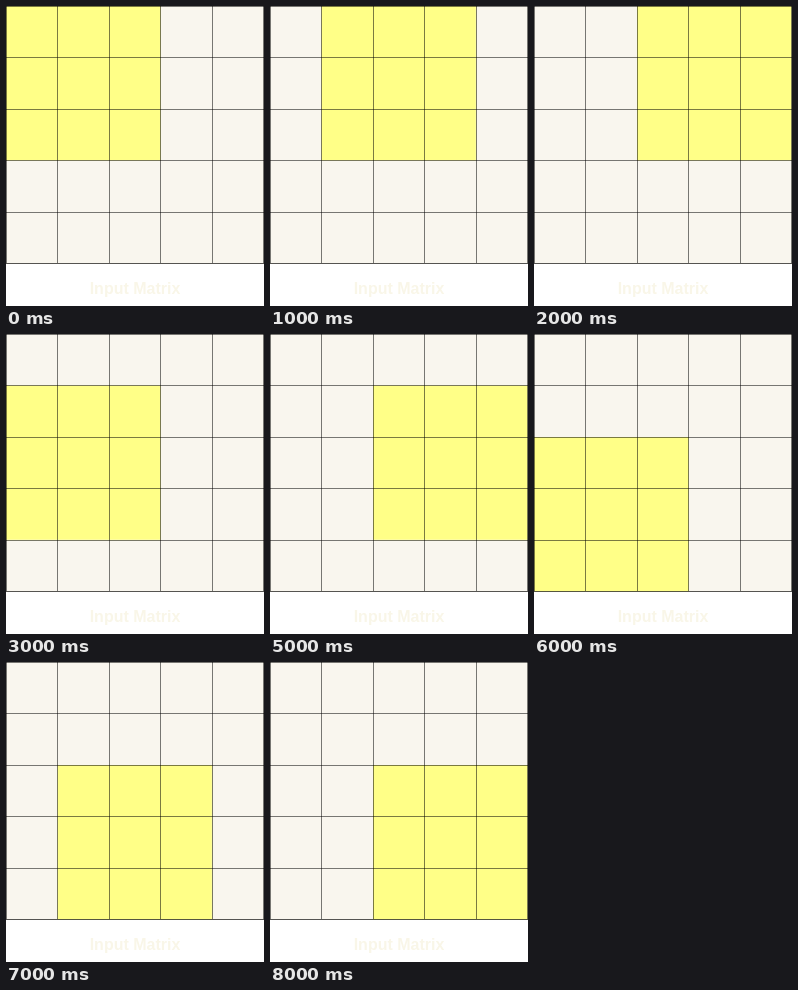
Write an HTML page that moves like this. It is 258 px wide and 300 px high and loops after 9 s.

```html
<!DOCTYPE html>
<html lang="en">
<head>
<meta charset="utf-8">
<title>Input Matrix</title>
<style>
  html, body { margin: 0; width: 100%; height: 100%; overflow: hidden; background: #fff; }
  svg { display: block; width: 258px; height: 300px; }
  .cells { fill: #f9f6ee; }
  .window { fill: #ffff87; }
  .lines { fill: none; stroke: #000; stroke-opacity: .52; }
  .base { stroke-opacity: .66; }
  text { font: bold 16px "Liberation Sans", Arial, sans-serif; text-anchor: middle; fill: #f9f6e8; }

  /* The window scans three columns, then drops one row. */
  .column { animation: across 3s steps(3) infinite; }
  .row { animation: down 9s steps(3) infinite; }
  @keyframes across { to { transform: translateX(154.5px); } }
  @keyframes down { to { transform: translateY(154.5px); } }
</style>
</head>
<body>
<svg viewBox="0 0 258 300">
  <rect class="cells" width="258" height="258"/>
  <g class="row"><g class="column">
    <rect class="window" width="154.7" height="154.5"/>
  </g></g>
  <path class="lines" d="M.5 0V257M51.5 0V257M103.5 0V257M154.5 0V257M206.5 0V257M257.5 0V257
    M0 .5H258M0 51.5H258M0 103.5H258M0 154.5H258M0 206.5H258"/>
  <path class="lines base" d="M0 257.5H258"/>
  <text x="129" y="288">Input Matrix</text>
</svg>
</body>
</html>
```
